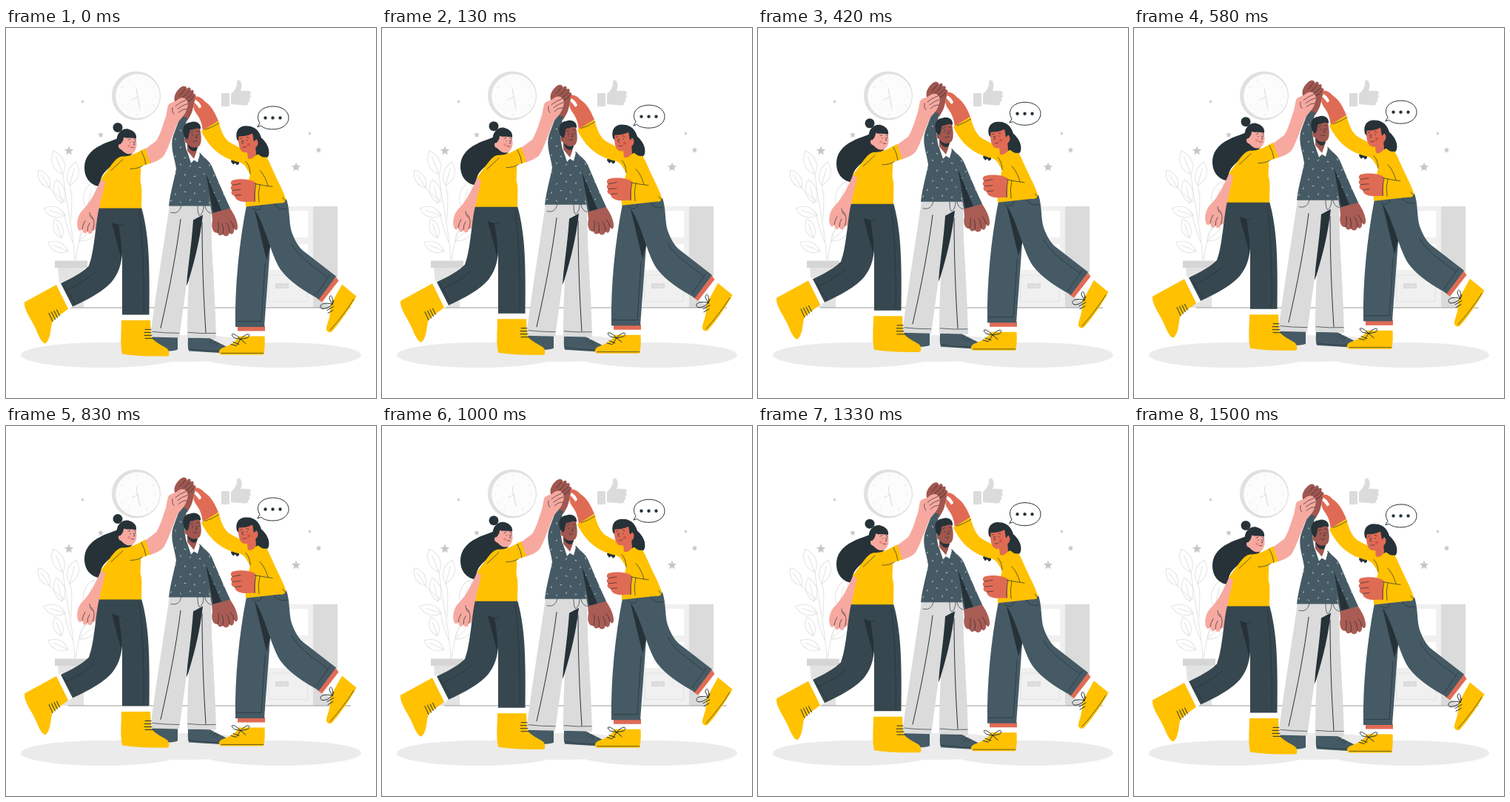
An HTML page that plays this animation: 500 px wide and 500 px high, repeating every 1.54 s.

```html
<!DOCTYPE html>
<html lang="en">
<head>
<meta charset="utf-8">
<title>High five</title>
<style>
html, body { margin: 0; height: 100%; overflow: hidden; background: #fff; }
svg { display: block; width: 100vw; height: 100vh; }
.y { fill: #ffc100; } .dk { fill: #263238; } .navy { fill: #37474f; } .slate { fill: #455a64; }
.pale { fill: #dbdbdb; } .w { fill: #fff; }
.pink { fill: #f7a9a0; } .brown { fill: #a95c54; } .deep { fill: #a0574f; } .coral { fill: #e06b55; }
.ln { fill: none; stroke: #263238; stroke-width: 1; stroke-linecap: round; stroke-linejoin: round; }
.thin { stroke-width: .7; }
.grey { fill: none; stroke: #e3e3e3; stroke-width: 1; }
</style>
</head>
<body>
<svg viewBox="0 0 500 500">
  <defs>
    <path id="sweater" d="M236 118L245 121C241 135 240 150 244 165L254 177 262 168C268 175 274 178 278 186C286 205 296 228 303 243L278 250 274 226 276 240H220C222 222 227 206 230 190C228 174 221 160 226 145Z"/>
    <clipPath id="knit"><use href="#sweater"/></clipPath>
  </defs>

  <g id="room">
    <g fill="#ebebeb">
      <ellipse cx="130" cy="442" rx="110" ry="17"/>
      <ellipse cx="370" cy="442" rx="110" ry="17"/>
      <ellipse cx="245" cy="433" rx="105" ry="18"/>
    </g>
    <path fill="#f0f0f0" d="M352 241H416V378H352Z"/>
    <path class="w" d="M356 247H408V283H356ZM356 292H408V327H356Z"/>
    <path class="pale" d="M415 241H448V378H415Z"/>
    <path class="grey" d="M355 334H407.500V369.500H355Z"/>
    <rect class="pale" x="364" y="345" width="18" height="7"/>
    <path fill="none" stroke="#e8e8e8" d="M367 348.500H378V351"/>
    <path fill="#e3e3e3" d="M70 323H105V378H75Z"/>
    <path fill="#d6d6d6" d="M66 314.500H110V324H66Z"/>
    <path d="M84 378H466" stroke="#999" stroke-width="1.2"/>
    <path class="grey" d="M93 314C91 275 82 240 77 198M94 314C97 285 108 262 117 238M88 258C88 240 91 228 86 213M81 235Q65 225 59 216M90 290Q82 268 79 253"/>
    <circle fill="#e0e0e0" cx="176" cy="91.500" r="33"/>
    <circle fill="#fcfcfc" cx="178" cy="92" r="29.800"/>
    <path fill="none" stroke="#cfcfcf" stroke-width=".8" d="M181 109L176 82M178 93L170 97"/>
    <path class="pale" d="M291 88H302V106H291ZM304 89C309 85 312 80 312 73C312 69 317 70 318 74C319 79 318 82 317 85H328C332 86 331 90 329 90C332 92 331 95 328 95C331 98 329 100 327 100C328 103 326 105 323 104.500L304 103Z"/>
  </g>

  <g id="team">
    <!-- speech bubble -->
    <path class="ln" d="M340 133L343 128C336 117 344 105.500 361 105.500C373 105.500 382 112 382 121C382 130 373 136.500 361 136.500C354 136.500 348 135 345 132Z" style="fill:#fff"/>
    <path d="M350.500 121h0M360.500 121h0M370.500 121h0" stroke="#263238" stroke-width="4.400" stroke-linecap="round"/>

    <!-- man -->
    <path class="slate" d="M198 416L232 417V434C222 438 204 436 194 430ZM246 418L275 418C283 424 298 428 301 433C301 437 297 438.500 288 438.500L247 436C245 430 246 424 246 418Z"/>
    <path class="ln thin" d="M247 433Q270 437 300 436M275 425l5 -5M279 427l5 -4M283 429l4 -4"/>
    <path class="dk" d="M247 258L267 249 263 300 244 348Z"/>
    <path class="pale" d="M221 239H277L278 290C280 330 283 375 284 419L245 418C245 388 246 360 247 340C256 310 262 285 266 252L253 259C251 290 246 322 244 345L234 418 195 417C202 362 212 300 221 239Z"/>
    <path class="ln" d="M236 258C230 305 221 352 209 405M265 262C265 315 267 365 270 411"/>
    <path class="ln thin" d="M198 410Q215 412 234 412M246 411Q265 413 283 412M223 249Q234 252 237 240M259 240Q259 253 262 253Q267 249 267 240M277 250Q270 248 269 240"/>
    <path class="deep" d="M235 125L238 111C230 106 226 98 228 91C230 85 235 79 240 78C243 78 245 80 244 82C248 78 251 81 249 84C253 82 255 85 253 88C257 88 257 92 256 95C253 102 253 112 249 118L245 125Z"/>
    <path class="ln thin" d="M235 90Q239 87 242 82M239 93Q244 90 248 84M243 96Q248 93 252 88M246 99Q251 97 254 92"/>
    <path class="brown" d="M278 249L302 242C308 250 314 262 313 270C312 274 309 273 308 270C309 278 304 280 302 276C301 282 295 282 293 278C291 281 286 280 286 276C279 278 277 267 279 260Z"/>
    <path class="ln thin" d="M308 270Q307 264 303 260M302 276Q302 268 298 263M293 278Q295 271 292 264M286 276Q288 270 287 262"/>
    <use class="slate" href="#sweater"/>
    <g id="flecks" clip-path="url(#knit)" stroke="#dfe6e9" stroke-width=".8"/>
    <path class="dk" d="M270 196L280 249 291 246Z"/>
    <path class="deep" d="M245 155L259 160 257 168 254 176 245 166Z"/>
    <path class="dk" d="M245 156C250 162 255 162 259 159C259 164 256 167 253 166C249 165 246 161 245 156Z"/>
    <path class="w" d="M244 164L254 177 258 167 262 170 259 181 254 178 250 182Z"/>
    <path class="deep" d="M247 137C252 134 259 133 262 135C264 145 265 155 261 159C256 163 249 161 246 156C241 156 239 147 245 147Z"/>
    <path class="dk" d="M242 148C237 139 239 128 249 127C256 124 264 128 263 136C257 133 253 138 249 137C247 141 248 146 245 150Z"/>
    <path class="ln thin" d="M252 144v1.500M260 143v1.500M249.500 141l3 -1.500M258 139l3 .5M257 144l1 4h-2M253 152.500Q255 154 258 152"/>

    <!-- woman on the left -->
    <path class="dk" d="M155 146C147 152 138 152 128 158C113 165 106 176 106 188C106 203 115 213 129 214C125 205 130 196 140 188L160 172Z"/>
    <circle class="dk" cx="151" cy="134" r="6.500"/>
    <path class="pink" d="M129 203C122 218 114 236 103 246C95 255 95 268 98 272C100 275 102 273 103 271C104 278 108 279 110 274C112 280 117 278 117 273C122 273 125 268 125 258L126 243 136 205Z"/>
    <path class="ln thin" d="M103 271Q104 264 107 260M110 274Q110 267 113 263M117 273C120 266 120 258 115 253M113 249q0 6 4 9"/>
    <path class="w" d="M66 346L76 342 91 375 84 380ZM157 386H194V396H157Z"/>
    <path class="y" d="M25 370L68 346.500 84 379C77 385 66 391 62 398C60 408 60 421 53 426C48 425 44 415 41 408C36 396 27 385 25 374Z"/>
    <path class="ln" d="M58 385l5 11M61.500 383.500l5 10M65 382l4.500 9M68.500 380.500l4 8"/>
    <path class="navy" d="M126 242C121 262 120 300 112 321C103 330 90 337 74 344.500L90 376C110 367 134 354 144 341C152 331 156 318 157 305V387H193.500C194 350 194 312 191 285C189 266 186 252 183 242Z"/>
    <path class="dk" d="M143 263L156 312C157 294 154 278 152 265Z"/>
    <path class="ln thin" d="M143 262Q150 268 158 265M180 248C184 275 187 330 186 384M78 348L93 372M120 330Q107 342 82 354"/>
    <path class="y" d="M156 394.500H195L196 416C199 424 213 429 218 433C221 437 221 441 219 443Q185 444 157 440C154 425 156 410 156 394.500Z"/>
    <path class="ln" d="M188 407h8M187 411h9M187 415h10M188 419h11"/>
    <path class="pink" d="M187 164L203 152C209 143 212 130 216 119L219 104C222 99 228 100 231 97C236 93 241 93 243 96C247 99 246 105 244 110C242 118 234 123 231 130C226 142 220 160 214 171C209 178 202 180 194 183Z"/>
    <path class="ln thin" d="M243 97Q235 100 229 105M245 102Q238 104 232 109M244 109Q238 109 233 114M225 107Q224 113 227 116"/>
    <path class="pink" d="M155 162L167 166 166 173 157 177Z"/>
    <path class="dk" d="M154 161C159 169 166 171 172 167L167 174H155Z"/>
    <path class="y" d="M157 173C150 174 146 180 142 185L128 204 134 207C132 219 128 231 126 243H183C183 232 184 222 183 213C180 204 183 196 182 187L195 182 188 162C178 168 165 174 157 173Z"/>
    <path class="ln thin" d="M183 166Q188 175 189 184M168 190Q178 190 184 186M158 177Q152 183 142 192"/>
    <path class="pink" d="M157 146H175C177 154 178 163 172 168C167 172 160 169 157 164C151 164 150 155 156 155Z"/>
    <path class="dk" d="M150 154C148 143 156 135 165 136C173 138 177 143 176 149C169 147 163 149 159 147C159 152 156 155 154 157Z"/>
    <circle fill="#f0867e" cx="166" cy="159" r="2"/>
    <path class="ln thin" d="M168 153.500v1M174.500 153v1M165 151l3 -1.500M173 150l2.500 1M172 153l2 4 -2 .5M169 161Q171 162.500 173 161"/>

    <!-- woman on the right -->
    <path class="dk" d="M306 173H315V183L312 185 310 182 307 184 304 180Z"/>
    <path class="w" d="M313 407H350V418H313ZM447 341L456 347 438 375 425 368Z"/>
    <path class="coral" d="M313 402H350V409H313ZM444 334L449.500 341 427 370 420 365Z"/>
    <path class="slate" d="M325 239C315 290 309 350 310 403.500H349C352 365 354 335 357 295L370 237Z"/>
    <path class="dk" d="M336 246L352 313 357 295 352 255Z"/>
    <path class="slate" d="M336 237L379 231C384 245 382 262 386 275C391 289 397 298 406 304L446 335 423 366C403 355 384 343 371 326C357 304 352 270 336 245Z"/>
    <path class="ln thin" d="M312 396H345Q348 350 350 318M438 333L419 360M434 336C412 320 395 308 386 292M333 243Q344 250 346 239M362 236Q366 246 379 244"/>
    <path class="y" d="M314 416H349.500C350 425 350 433 348 441H290C286 438 288 434 292 432C302 428 312 424 314 416ZM454 346L473.500 362C469 372 450 400 440 410C436 412 432 409 433 404C435 396 439 388 438 375Z"/>
    <path class="ln thin" d="M291 439H348M438 408Q456 388 470 366"/>
    <path class="ln" d="M317 420C306 409 302 413 308 418ZM317 420C326 410 332 413 327 418ZM317 420L312 428M317 420L324 426M307 424l8 3M304 427l7 2M441 373C443 360 437 359 437 365ZM441 373C428 369 421 375 427 379Q434 380 441 373M434 381l9 -5M435 385l7 -4M441 373l2 -5"/>
    <path class="coral" d="M254 93C257 91 263 92 268 98C277 104 282 113 287 125L266 139C265 130 263 123 258 116C254 111 252 105 254 100C257 102 259 105 261 108C265 107 264 104 262 102C260 97 255 98 254 93Z"/>
    <path class="dk" d="M312 150C309 138 316 131 326 132C337 132 343 140 345 148C351 153 357 162 355 171C353 177 347 179 341 176L328 168Z"/>
    <path class="y" d="M264 139L287 125C291 140 295 150 304 155C313 160 320 163 327 167L336 172 346 168C354 174 356 182 360 190C366 204 374 218 378 230C379 234 375 237 370 236L324 241C323 225 327 208 330 197C325 190 324 184 316 181C290 176 274 160 264 139Z"/>
    <path class="dk" d="M337 150L346 149C351 155 356 163 355 171C352 176 346 175 341 170L334 163Z"/>
    <path class="coral" d="M337 208C328 203 316 203 307 205C303 206 303 211 306 212C303 213 303 218 306 219C303 221 305 226 309 226C309 231 315 234 323 234.500L337 234Z"/>
    <path class="ln thin" d="M306 212L317 210M306 219L317 218M309 226L318 225M269 137Q279 134 288 128M338 210Q335 222 336 234M343 211Q340 223 342 235M336 210Q350 213 360 214M343 192C349 198 352 206 354 213M324 180Q330 186 330 197M374 229l4 5"/>
    <path class="coral" d="M325 160L337 158 338 170C335 176 330 177 327 176Z"/>
    <path class="coral" d="M315 143C313 155 315 164 320 167C325 169 331 167 335 162C342 160 342 151 337 149L335 141Z"/>
    <path class="dk" d="M313 146C312 139 318 134 326 134C333 134 339 141 338 150L335 153C334 149 334 145 333 142C327 145 320 146 313 146Z"/>
    <circle fill="#cf4f43" cx="328" cy="157" r="2"/>
    <path class="ln thin" d="M318.500 151.500v1M326 151v1M316.500 149l2.500 -1M325 147l3 1M321 151l-2 4 2 .5M320 160.500Q322 162 325 160"/>
  </g>
</svg>
<script>
const LOOP = 1540, FLOAT = 1500, RISE = 10, REST = .4;
const $ = id => document.getElementById(id);

function add(parent, d, attrs) {
  const p = document.createElementNS("http://www.w3.org/2000/svg", "path");
  p.setAttribute("d", d);
  for (const k in attrs) p.setAttribute(k, attrs[k]);
  parent.append(p);
}

function star(x, y, r) {
  const pts = Array.from({ length: 10 }, (_, i) => {
    const a = i * Math.PI / 5, q = i % 2 ? r * .45 : r;
    return [x + q * Math.sin(a), y - q * Math.cos(a)];
  });
  add($("room"), "M" + pts.join("L") + "Z", { fill: "#c7c7c7" });
}

function leaf(x, y, tipX, tipY) {
  const len = Math.hypot(tipX - x, tipY - y), turn = Math.atan2(tipX - x, y - tipY) * 180 / Math.PI;
  const w = len * .3;
  add($("room"), `M0 0C${-w} ${-len * .3} ${-w} ${-len * .7} 0 ${-len}C${w} ${-len * .7} ${w} ${-len * .3} 0 0V${-len * .75}`,
    { class: "grey", transform: `translate(${x} ${y}) rotate(${turn})` });
}

[[103.5, 99.5, 2.6], [128, 144.5, 4.2], [85, 166, 6.5], [410.5, 142.5, 2.6], [422.5, 165, 4.2], [392, 188, 6.5]]
  .forEach(s => star(...s));
[[77, 198, 64, 166], [86, 213, 95, 181], [59, 216, 44, 192], [76, 237, 68, 205], [80, 253, 51, 244],
 [75, 284, 66, 258], [84, 302, 57, 290], [99, 288, 125, 264], [109, 245, 118, 208]]
  .forEach(l => leaf(...l));

for (let i = 0; i < 12; i++)
  add($("room"), "M178 66v3", { stroke: "#e6e6e6", "stroke-width": .8, transform: `rotate(${i * 30} 178 92)` });

// scattered knit flecks on a staggered grid
for (let i = 0; i < 54; i++) {
  const row = i / 6 | 0, x = 223 + i % 6 * 13 + row % 2 * 6, y = 136 + row * 12 + i * 7 % 5;
  add($("flecks"), "M-1.3 0H1.3", { transform: `translate(${x} ${y}) rotate(${i * 67 % 180})` });
}

// even rise and fall, then a short rest until the loop ends
function draw(now) {
  const phase = Math.min(now % LOOP / FLOAT, 1);
  const lift = RISE * (1 - Math.abs(1 - 2 * phase));
  $("team").setAttribute("transform", `translate(0 ${REST - lift})`);
  requestAnimationFrame(draw);
}
requestAnimationFrame(draw);
</script>
</body>
</html>
```
